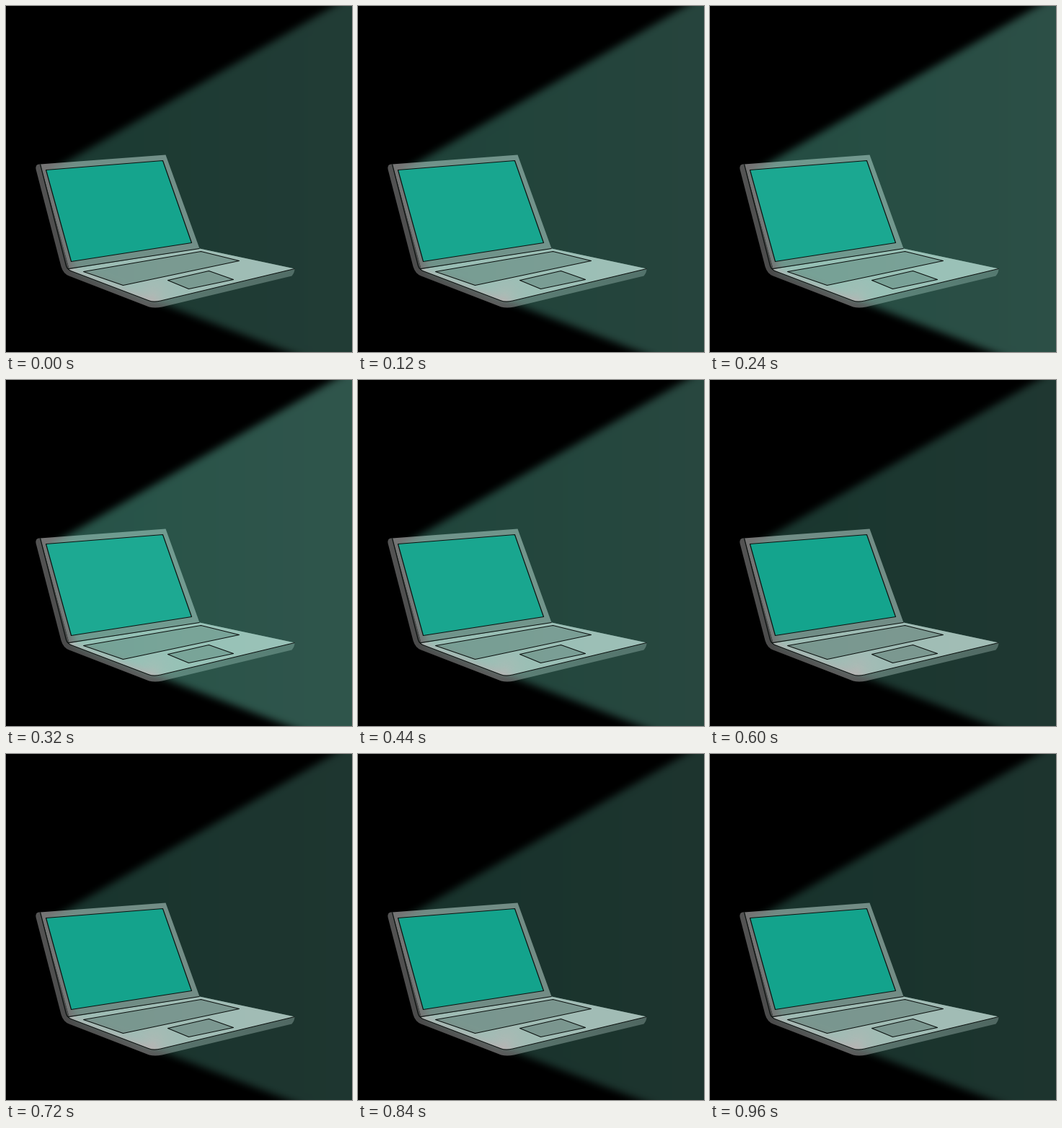
An HTML page that plays this animation: 480x480 px, repeating every 1 s.

```html
<!DOCTYPE html>
<html lang="en">
<head>
<meta charset="utf-8">
<title>Laptop glow</title>
<style>
html, body { margin: 0; height: 100%; overflow: hidden; background: #000; }
svg { display: block; width: 100%; height: 100%; }
.ink { stroke: #0c1210; stroke-width: 1.2; stroke-linejoin: round; }
</style>
</head>
<body>
<svg viewBox="0 0 480 480">
  <defs>
    <linearGradient id="light" gradientUnits="userSpaceOnUse" x1="60" x2="480" y1="0" y2="0">
      <stop offset="0" stop-color="#64d8ba"/>
      <stop offset="1" stop-color="#7cdcc4"/>
    </linearGradient>
    <linearGradient id="side" gradientUnits="userSpaceOnUse" x1="40" x2="400" y1="0" y2="0">
      <stop offset="0" stop-color="#545454"/>
      <stop offset=".12" stop-color="#4a4a4a"/>
      <stop offset=".42" stop-color="#5c5c5c"/>
      <stop offset=".55" stop-color="#525252"/>
      <stop offset="1" stop-color="#444"/>
    </linearGradient>
    <radialGradient id="blush" gradientUnits="userSpaceOnUse" cx="204" cy="401" r="44">
      <stop offset="0" stop-color="#c4aeb2"/>
      <stop offset="1" stop-color="#b0b3b2" stop-opacity="0"/>
    </radialGradient>
    <filter id="soft" filterUnits="userSpaceOnUse" x="0" y="-60" width="560" height="640">
      <feGaussianBlur stdDeviation="5.5"/>
    </filter>
    <path id="deck" d="M85 365L268 336L400 364L214 408.500Q204 411 197 408L92 368Z"/>
  </defs>
  <rect width="480" height="480"/>

  <g transform="translate(.5 .5)">
    <path fill="url(#side)" d="M47 219Q40 218 41 226L76 361Q79 371 87 374L198 417Q206 419 216 417L396 374Q400 369 400 364L268 336L87 364Z"/>
    <use href="#deck" fill="#b0b3b2"/>
    <use href="#deck" fill="url(#blush)"/>
    <path fill="#747474" d="M47 219L221 206L268 336L87 364Z"/>
    <path fill="#7f8281" d="M107 368L270 340L323 353L162 387ZM224 380L281 367L315 379L253 392Z"/>
  </g>

  <g id="beam" filter="url(#soft)">
    <path fill="url(#light)" d="M62 229L455 0L541 -50V537L392 480L96 367Z"/>
  </g>

  <g class="ink" fill="none" transform="translate(.5 .5)">
    <path id="screen" d="M55 227L217 214L257 328L90 354Z"/>
    <path d="M107 368L270 340L323 353L162 387ZM224 380L281 367L315 379L253 392Z"/>
    <path d="M47 219L83 360Q85 366 92 368L197 408Q204 411 214 408.500L400 364M86 364L268 336"/>
  </g>
</svg>
<script>
const beam = document.getElementById('beam');
const pane = document.getElementById('screen');
// [time in ms, beam strength]
const keys = [[0, .27], [120, .31], [320, .385], [520, .28], [600, .25], [840, .235], [960, .235], [1000, .27]];

function strength(t) {
  const i = keys.findIndex(k => k[0] > t);
  const [t0, a] = keys[i - 1], [t1, b] = keys[i];
  return a + (b - a) * (t - t0) / (t1 - t0);
}

function draw(now) {
  const s = strength(Math.floor(now % 1000 / 40) * 40);
  const lift = (s - .235) / .15;
  beam.style.opacity = s;
  pane.style.fill = `rgb(${19 + 10 * lift}, ${163 + 6 * lift}, ${140 + 6 * lift})`;
  requestAnimationFrame(draw);
}
draw(0);
</script>
</body>
</html>
```
